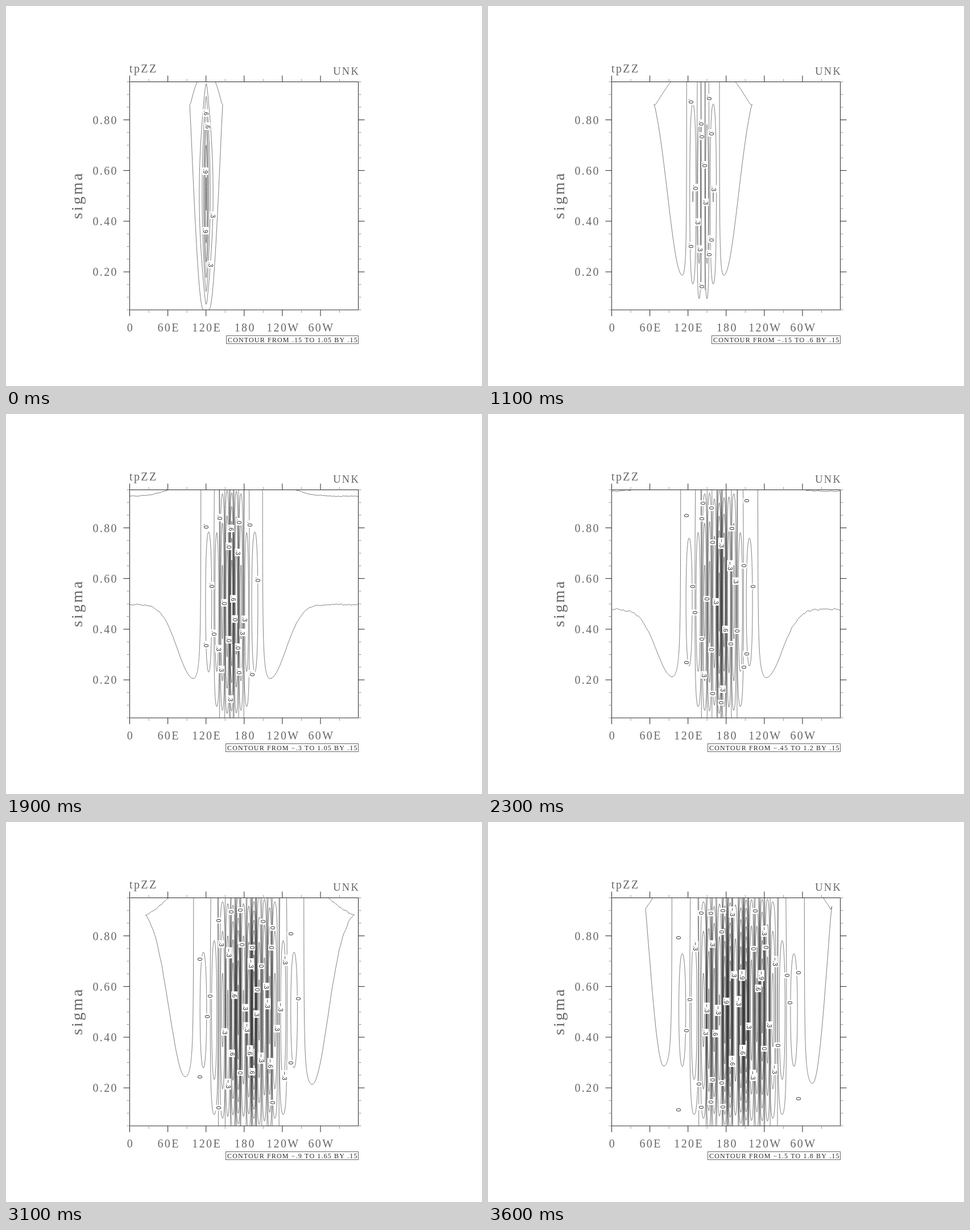
An HTML page with a canvas that plays this animation: 837x669 px, repeating every 3700 ms.

```html
<!DOCTYPE html>
<html lang="en">
<head>
<meta charset="utf-8">
<title>Sigma section contours</title>
<style>
html, body { margin: 0; width: 100%; height: 100%; overflow: hidden; background: #fff; }
canvas { display: block; }
</style>
</head>
<body>
<canvas id="plot" width="837" height="669"></canvas>
<script>
const ctx = document.getElementById("plot").getContext("2d");
const STEPS = 37, STEP_MS = 100;
const LEFT = 217.5, RIGHT = 619.5, TOP = 133.5, BOTTOM = 535;
const INK = "#2a2a2a", SERIF = "'Liberation Serif', serif";
const DECAY = .00662, MID = 331;

// Lowest and highest contour, in steps of .15, at a few times in seconds
const ranges = [[0, 1, 7], [.7, -1, 2], [1.5, -1, 5], [2.3, -3, 8], [2.7, -7, 6], [3.1, -6, 11], [3.6, -10, 12]];

const lerp = (a, b, u) => a + (b - a) * u;

function random(seed) {
  return () => {
    seed = (seed + 0x6d2b79f5) | 0;
    let v = Math.imul(seed ^ (seed >>> 15), 1 | seed);
    v = (v + Math.imul(v ^ (v >>> 7), 61 | v)) ^ v;
    return ((v ^ (v >>> 14)) >>> 0) / 4294967296;
  };
}

function rangeAt(t) {
  const i = Math.max(1, ranges.findIndex(r => r[0] >= t));
  const a = ranges[i - 1], b = ranges[i], u = (t - a[0]) / (b[0] - a[0]);
  return [1, 2].map(c => Math.round(lerp(a[c], b[c], u)));
}

function trace(points) {
  ctx.beginPath();
  points.forEach(([x, y], i) => i ? ctx.lineTo(x, y) : ctx.moveTo(x, y));
  ctx.stroke();
}

const line = (x1, y1, x2, y2) => trace([[x1, y1], [x2, y2]]);

// The packet spreads from 120E, mostly eastward
function edges(t) {
  const late = Math.max(0, t - .7);
  return [352 - 6.2 * late - 1.25 * late ** 2, 352 + 47 * t + 2.7 * t ** 2];
}

// Lobes between the edges: wide at the rim, evenly spaced inside
function packet(t) {
  const [left, right] = edges(t), age = t - 1.5;
  const n = Math.max(1, Math.floor(3 + 5.2 * (t - .7) + 1e-6));
  const rim = [1.6 + .16 * age, 1.65 + .27 * age, 1.1 + .31 * age];
  const weights = Array.from({ length: n + 1 }, (_, i) => rim[Math.min(i, n - i)] || 1);
  const unit = (right - left) / weights.reduce((a, b) => a + b);
  const peak = 5.6 + 3 * age, beat = 384 + 32 * age;
  let x = left;
  return Array.from({ length: n }, (_, i) => {
    x += weights[i] * unit;
    const order = Math.min(i, n - 1 - i), gap = (weights[i] + weights[i + 1]) / 2 * unit;
    const swell = Math.sin(Math.PI * (i - 2) / (n - 5));
    const strong = peak * (.62 + .38 * Math.cos(2 * Math.PI * (x - beat) / 30));
    let a = 2.9;
    if (n === 1) a = lerp(7.13, 2.95, t / .7);
    else if (order === 0) a = 1.25 + .4 * Math.exp(-1.6 * age);
    else if (order > 1) a = lerp(3.3, Math.max(2.6, strong), swell);
    return { x, a, gap, w: gap * (order ? .53 : .75), open: order === 1, single: n === 1, odd: i % 2 === 1 };
  });
}

function strength(lobe, y, k) {
  const d = y - MID;
  const lift = lobe.open && k === 1 && d < 0 ? .42 * (d / 197) ** 2 : 0;
  return lobe.a * (Math.cos(DECAY * d) + lift);
}

function halfWidth(lobe, y, k, t) {
  const r = Math.max(1, strength(lobe, y, k) / k);
  const wave = lobe.w * 2 / Math.PI * Math.acos(1 / r);
  if (!lobe.single) return wave;
  const u = 4.2 * (r - 1), pulse = Math.sqrt(u * (u + 3));
  return lerp(pulse, wave, t / .7);
}

function drawLobe(lobe, t) {
  for (let k = lobe.single ? 2 : 1; k < lobe.a; k++) {
    const reach = Math.acos(k / lobe.a) / DECAY;
    const y0 = lobe.open && k === 1 ? TOP : Math.max(TOP, MID - reach);
    const y1 = Math.min(BOTTOM, MID + reach);
    for (const side of [-1, 1]) {
      trace(Array.from({ length: 61 }, (_, i) => {
        const y = lerp(y0, y1, (1 - Math.cos(Math.PI * i / 60)) / 2);
        return [lobe.x + side * halfWidth(lobe, y, k, t), y];
      }));
    }
  }
}

function drawPacket(lobes, t) {
  lobes.forEach(lobe => drawLobe(lobe, t));
  const end = lobes.length < 8 ? 500 : BOTTOM;
  for (let i = 1; i < lobes.length - 2; i++) {
    const x = (lobes[i].x + lobes[i + 1].x) / 2;
    line(x, TOP, x, end);
  }
}

// Weak contour beside the packet: two branches that join where they meet
function drawWing(side, t) {
  const u = t - 2.3, edge = edges(t)[side < 0 ? 0 : 1];
  const foot = Math.min(14.5, 5 + 6.5 * Math.max(0, t - .7)), tipX = edge + side * foot;
  const tipY = 463 + 72 * Math.exp(-1.7 * t) - (side < 0 ? 3.6 : .3) * Math.max(0, t - 1.5) ** 3;
  const low = Math.max(-240, 344 - (u < 0 ? 133 * -(u ** 3) : 300 * u * u));
  const high = 136 + 55 * u * u, spread = Math.min(40, 30 + 6 * t);
  const rand = random(Math.round(t * 10) * 2 + side + 5);
  const below = [], above = [];
  const limit = side < 0 ? tipX - LEFT : RIGHT - tipX;
  let joined = false, rough = 0;
  for (let d = 0; d <= limit + 2; d += 2) {
    rough = rough * .5 + (rand() - .5) * Math.max(0, t - 1) * 2.2 * Math.min(1, d / 60);
    const lower = low + (tipY - low) * Math.exp(-((d / spread) ** 2)) + rough;
    const upper = high - (high - 120) * Math.exp(-((d / 52) ** 2)) - rough * .6;
    const x = tipX + side * d;
    joined = lower <= upper;
    if (joined) {
      below.push([x, (lower + upper) / 2]);
      break;
    }
    below.push([x, lower]);
    above.push([x, upper]);
  }
  if (joined) trace([...below, ...above.reverse()]);
  else [below, above].forEach(trace);

  if (tipY >= BOTTOM - 1) return;
  const inner = [];
  for (let h = 0; h <= tipY - TOP; h += h < 40 ? 1 : 8) {
    inner.push([edge + side * foot * Math.exp(-((h / 22) ** .6)), tipY - h]);
  }
  inner.push([edge, TOP]);
  trace(inner);
}

const decimal = v => String(+(v * .15).toFixed(2)).replace("0.", ".").replace("-", "−");

// Up to three labels a lobe, each breaking a contour; crowded ones are dropped
function drawLabels(lobes, t) {
  const rand = random(Math.round(t * 10) + 40), lo = rangeAt(t)[0], placed = [];
  ctx.font = "11px 'Liberation Sans', sans-serif";
  ctx.textAlign = "center";
  ctx.textBaseline = "middle";
  const perLobe = lobes.length === 1 ? 6 : 3;
  lobes.forEach((lobe, i) => {
    for (let j = 0; j < perLobe; j++) {
      const y = 150 + 360 * ((j + rand()) / perLobe), side = (i + j) % 2 ? 1 : -1;
      const top = Math.min(4, Math.floor(strength(lobe, y, 2) / 2));
      const k = 2 * Math.max(lobe.single ? 1 : 0, Math.floor(rand() * (top + 1)));
      const x = lobe.x + side * (k ? halfWidth(lobe, y, k, t) : lobe.gap * (lobe.open ? .42 : .36));
      if (placed.some(p => Math.abs(p[0] - x) < 13 && Math.abs(p[1] - y) < 22)) continue;
      placed.push([x, y]);
      const sign = lobe.odd && lo <= -3 && k ? -1 : 1;
      const str = k ? decimal(sign * k) : lo > -3 ? ".0" : "0";
      const w = ctx.measureText(str).width + 4;
      ctx.save();
      ctx.translate(x, y);
      ctx.rotate(Math.PI / 2);
      ctx.fillStyle = "#fff";
      ctx.fillRect(-w / 2, -5.5, w, 11);
      ctx.fillStyle = INK;
      ctx.fillText(str, 0, .5);
      ctx.restore();
    }
  });
}

function text(str, x, y, size, align = "left", turn = 0) {
  ctx.save();
  ctx.translate(x, y);
  ctx.rotate(turn);
  ctx.font = `${size}px ${SERIF}`;
  ctx.letterSpacing = `${size * .12}px`;
  ctx.textAlign = align;
  ctx.textBaseline = "alphabetic";
  ctx.fillText(str, 0, 0);
  ctx.restore();
}

function drawAxes() {
  ctx.strokeStyle = INK;
  ctx.lineWidth = 1;
  ctx.strokeRect(LEFT, TOP, RIGHT - LEFT, BOTTOM - TOP);
  const tick = major => {
    ctx.strokeStyle = major ? "#222" : "#999";
    return major ? 11 : 5;
  };
  for (let i = 0; i < 12; i++) {
    const x = LEFT + i * 33.55, len = tick(i % 2 === 0);
    line(x, TOP, x, TOP - len);
    line(x, BOTTOM, x, BOTTOM + len);
  }
  for (let i = 0; i <= 18; i++) {
    const y = TOP + i * (BOTTOM - TOP) / 18, len = tick(i % 4 === 3);
    line(LEFT, y, LEFT - len, y);
    line(RIGHT, y, RIGHT + len, y);
  }
  ctx.fillStyle = "#666";
  ["0", "60E", "120E", "180", "120W", "60W"].forEach((s, i) => text(s, 219 + i * 67.1, 573, 20, "center"));
  ["0.80", "0.60", "0.40", "0.20"].forEach((s, i) => text(s, 197, 207.5 + i * 89.2, 20, "right"));
  text("tpZZ", 217, 117, 20);
  text("UNK", 622, 121, 18.5, "right");
  text("sigma", 134, 375, 28, "left", -Math.PI / 2);
}

function drawCaption(t) {
  const [lo, hi] = rangeAt(t).map(decimal);
  const str = `CONTOUR FROM ${lo} TO ${hi} BY .15`;
  ctx.save();
  ctx.font = `12px ${SERIF}`;
  ctx.letterSpacing = "1.15px";
  ctx.textAlign = "left";
  ctx.textBaseline = "alphabetic";
  const x = Math.round(618 - ctx.measureText(str).width) - 1.5;
  ctx.strokeStyle = "#666";
  ctx.strokeRect(x, 580.5, RIGHT - x, 14);
  ctx.fillStyle = INK;
  ctx.fillText(str, x + 2.5, 592);
  ctx.restore();
}

function draw(t) {
  const lobes = packet(t);
  ctx.fillStyle = "#fff";
  ctx.fillRect(0, 0, 837, 669);
  ctx.save();
  ctx.beginPath();
  ctx.rect(LEFT, TOP, RIGHT - LEFT, BOTTOM - TOP);
  ctx.clip();
  ctx.strokeStyle = INK;
  ctx.lineWidth = .6;
  drawWing(-1, t);
  drawWing(1, t);
  drawPacket(lobes, t);
  drawLabels(lobes, t);
  ctx.restore();
  drawAxes();
  drawCaption(t);
}

let shown = -1;
const start = performance.now();
function loop() {
  const step = Math.floor((performance.now() - start) / STEP_MS) % STEPS;
  if (step !== shown) {
    shown = step;
    draw(step / 10);
  }
  requestAnimationFrame(loop);
}
loop();
</script>
</body>
</html>
```
